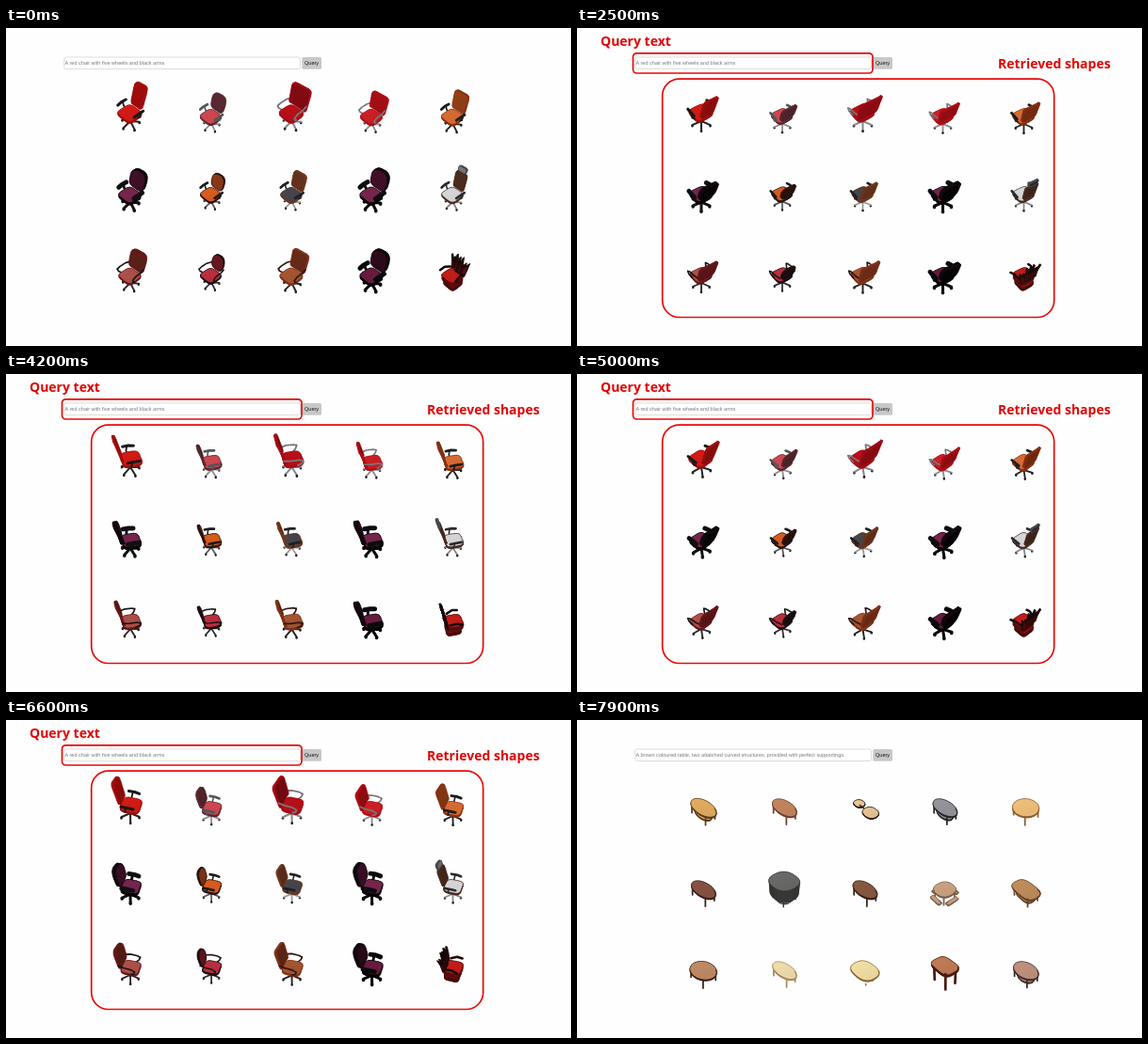
These frames come from a looping animation (600 by 338 pixels, 8000 ms). An HTML page with a canvas:

```html
<!DOCTYPE html>
<html lang="en">
<head>
<meta charset="utf-8">
<title>Shape retrieval</title>
<style>
  html, body { margin: 0; width: 100%; height: 100%; overflow: hidden; background: #fefefe; }
  canvas, svg { position: absolute; left: 0; top: 0; width: 600px; height: 338px; }
  .ui { font: 5.54px "Liberation Sans", Arial, sans-serif; text-rendering: geometricPrecision; }
  .note text { font: 700 14px "Open Sans", "Noto Sans", sans-serif; fill: #e00505; }
  .note rect { fill: none; stroke: #e60a0a; stroke-width: 1.7; }
</style>
</head>
<body>
<canvas id="stage" width="600" height="338"></canvas>
<svg viewBox="0 0 600 338">
  <g class="ui">
    <rect x="61.8" y="31" width="250.6" height="12.6" rx="2" fill="#fff" stroke="#cecece" stroke-width=".7"/>
    <text id="query" x="62.6" y="39.2" fill="#777"></text>
    <rect x="314.3" y="31" width="20.7" height="12.8" rx="1.5" fill="#c8c8c8"/>
    <text x="317" y="39.3" fill="#111">Query</text>
  </g>
  <g class="note" id="queryNote">
    <text x="25" y="19">Query text</text>
    <rect x="59.5" y="26.8" width="254.5" height="21.2" rx="4"/>
  </g>
  <g class="note" id="shapesNote">
    <text x="447" y="42.7">Retrieved shapes</text>
    <rect x="90.7" y="54.2" width="416" height="253.3" rx="18"/>
  </g>
</svg>
<script>
const $ = id => document.getElementById(id);
const ctx = $('stage').getContext('2d');
ctx.lineJoin = ctx.lineCap = 'round';

const LOOP = 8000, STEP = 100, SWITCH = 7800;
const TILT = 0.76, SIN = Math.sin(TILT), COS = Math.cos(TILT), DIST = 150;
const COLS = [132, 218, 303.5, 388.5, 474.5], ROWS = [87, 174, 260];
// time, degrees; 0 faces the viewer
const TURN = [[0, -46], [800, 53], [1000, 53], [1700, 141], [1900, 141], [2500, 216],
  [3400, 343], [5000, 584], [6000, 720], [6600, 793], [8000, 980]];

// size, half width, back height, squareness, arms, seat, back, rear, base, arm colour
const CHAIRS = [
  [.95, 8.5, 27, 6, 'pad', '#dc1c16', '#a40c0c', '#a41010', '#222', '#181818'],
  [.84, 10.5, 22, 3.5, 'pad', '#d84a54', '#5c2a32', '#5c2a32', '#8c8c90', '#55555a'],
  [.95, 13, 25, 9, 'loop', '#c01018', '#860a12', '#a80c16', '#85858a', '#77777c'],
  [.86, 12.5, 22, 9, 'loop', '#d42026', '#a80e14', '#b01016', '#8c8c90', '#77777c'],
  [.87, 10.5, 24, 7, 'pad', '#e07034', '#964018', '#8a3214', '#222', '#1c1c1c'],
  [.88, 11.5, 23, 3.2, 'thick', '#7c2650', '#42102a', '#080608', '#111', '#101012'],
  [.82, 10, 20, 3, 'pad', '#e2601e', '#8e3a18', '#2c1410', '#56565a', '#1a1a1a'],
  [.84, 10, 22, 6, 'pad', '#48484e', '#66341e', '#74381e', '#9a9a9e', '#202024'],
  [.9, 12, 23, 3.2, 'thick', '#7c2650', '#42102a', '#060406', '#0c0c0c', '#0c0c0e'],
  [.85, 8.5, 22, 7, 'head', '#e0e0e2', '#4e2e1e', '#4a2c20', '#88888c', '#2a2a2e'],
  [.87, 12, 24, 4.5, 'loop', '#b4544c', '#5e2018', '#6a181c', '#2a2526', '#141414'],
  [.82, 9.5, 20, 2.5, 'loop', '#c43040', '#6c1820', '#1e1012', '#2c2c2e', '#161616'],
  [.9, 11.5, 23, 8, 'loop', '#ac5832', '#6a2c18', '#82341a', '#261e1c', '#2e1814'],
  [.9, 12, 23, 3.2, 'thick', '#6e1c42', '#2e0a1a', '#060406', '#080808', '#09090a'],
  [.84, 11, 24, 4, 'spikes', '#cc1e1a', '#300c0c', '#5c0e0e', '#50100e', '#180808']
];

// top colour, edge colour, half length, half width, squareness, kind
const TABLES = [
  ['#e8b062', '#5a3a20', 18.5, 10.5, 2, 'shelf'],
  ['#c88862', '#704232', 17.5, 10, 2, 'legs'],
  ['#f0cc98', '#201812', 8, 6, 2.3, 'pair'],
  ['#98989e', '#26262a', 17.5, 10, 2, 'shelf'],
  ['#f4c47c', '#8a6034', 15.5, 14.5, 2, 'legs'],
  ['#8a5444', '#38201a', 17.5, 10, 2, 'legs'],
  ['#6a6a68', '#3a3a38', 16, 15, 2.4, 'drum'],
  ['#8c5a42', '#38201a', 17.5, 10, 2, 'legs'],
  ['#d0a684', '#7a5e4a', 12, 12, 2.4, 'bench'],
  ['#c4905e', '#64442a', 18, 11, 3, 'shelf'],
  ['#c48e66', '#3a2418', 16.5, 14, 2, 'legs'],
  ['#f6e2b0', '#a88a5c', 17.5, 9.5, 2, 'legs'],
  ['#f8e4a8', '#8a6836', 17, 13, 2.6, 'stem'],
  ['#c47c56', '#4a1c14', 15, 11, 3.5, 'tall'],
  ['#c49480', '#3c2c28', 17, 11.5, 2, 'shelf']
];

let parts, cos, sin, ox, oy, size;

function begin(x, y, scale, degrees) {
  const a = degrees * Math.PI / 180;
  [parts, cos, sin, ox, oy, size] = [[], Math.cos(a), Math.sin(a), x, y, scale];
}

function view([x, y, z]) {
  const ahead = y * cos - x * sin;
  return [x * cos + y * sin, z * COS - ahead * SIN, ahead * COS + z * SIN];
}

function path(pts) {
  ctx.beginPath();
  for (const [x, up, depth] of pts) {
    const k = size * DIST / (DIST - depth);
    ctx.lineTo(ox + x * k, oy - up * k);
  }
}

const depthOf = pts => pts.reduce((sum, p) => sum + p[2], 0) / pts.length;

// How squarely a face meets the eye, 0 to 1
function facing(pts) {
  const n = pts.length, [a, b, c] = [pts[0], pts[n / 3 | 0], pts[2 * n / 3 | 0]];
  const [u, v] = [b, c].map(p => p.map((q, i) => q - a[i]));
  const nx = u[1] * v[2] - u[2] * v[1], ny = u[2] * v[0] - u[0] * v[2], nz = u[0] * v[1] - u[1] * v[0];
  return Math.abs(nz) / (Math.hypot(nx, ny, nz) || 1);
}

function face(pts, color, rim) {
  path(pts);
  ctx.fillStyle = color;
  ctx.fill();
  const dark = .5 * Math.max(0, .65 - facing(pts));
  const shade = ctx.createLinearGradient(ox - 12, oy - 22, ox + 12, oy + 22);
  shade.addColorStop(0, `rgba(0,0,0,${dark})`);
  shade.addColorStop(1, `rgba(0,0,0,${dark + .1})`);
  ctx.fillStyle = shade;
  ctx.fill();
  ctx.strokeStyle = rim;
  ctx.lineWidth = .5;
  ctx.closePath();
  ctx.stroke();
}

function slab(front, rear, color, rearColor, side) {
  const [f, r] = [front.map(view), rear.map(view)];
  const faces = f.map((p, i) => {
    const j = (i + 1) % f.length;
    return [[p, f[j], r[j], r[i]], side];
  });
  faces.push([f, color], [r, rearColor]);
  faces.sort((a, b) => depthOf(a[0]) - depthOf(b[0]));
  parts.push([depthOf([...f, ...r]), () => faces.forEach(([pts, c]) => face(pts, c, side))]);
}

function tube(pts, color, width) {
  const p = pts.map(view);
  parts.push([depthOf(p), () => {
    path(p);
    ctx.strokeStyle = color;
    ctx.lineWidth = width * size;
    ctx.stroke();
  }]);
}

function paint() {
  parts.sort((a, b) => a[0] - b[0]).forEach(p => p[1]());
}

// Superellipse: 2 is an oval, larger is squarer
function outline(w, h, power, n = 28) {
  const bend = q => Math.sign(q) * Math.abs(q) ** (2 / power);
  return Array.from({ length: n }, (_, i) => {
    const a = (i + .5) / n * 2 * Math.PI;
    return [w * bend(Math.cos(a)), h * bend(Math.sin(a))];
  });
}

function plate(w, h, power, z, thick, color, side, x = 0, y = 0) {
  const at = level => outline(w, h, power).map(([u, v]) => [x + u, y + v, level]);
  slab(at(z), at(z - thick), color, side, side);
}

function backrest(w, h, power, z, thick, color, rear, side) {
  const at = shift => outline(w, h / 2, power).map(([u, v]) => {
    const up = v + h / 2;
    return [u, -9 - (z + 3 + up) * .24 + u * u * .012 - shift, z + up];
  });
  slab(at(0), at(thick), color, rear, side);
}

function arm(side, kind, color) {
  const x = side * 13;
  if (kind === 'loop') {
    tube([[x * .85, -11, 5], [x, -4, 5.5], [x, 5, 5], [x * 1.03, 9, 3]], color, 1.9);
    tube([[x * 1.03, 9, 3], [x, 8, -1], [x * .85, 4, -5]], color, 1.9);
    return;
  }
  const wide = kind === 'thick' ? 5.5 : 3.2;
  tube([[x * .8, -2, -6], [x * 1.05, -2, -3], [x * 1.05, -1, 3]], color, wide * .6);
  tube([[x * 1.05, -6, 3.5], [x * 1.05, 1, 3.8], [x, 7, 3]], color, wide);
}

function spikes(w, color, rear, edge) {
  for (let i = -3; i <= 3; i++) {
    const u = i * 3, tip = 17 - Math.abs(i) * 2 + (i & 1) * 4;
    const at = y => [[u - 2.4, y, -5], [u + 2.4, y, -5], [u * 1.25 + 2, y - 2, 6], [u * 1.6, y - 4, tip], [u * 1.1 - 2, y - 2, 6]];
    slab(at(-8), at(-10), i & 1 ? rear : color, rear, edge);
  }
  for (const s of [-1, 1]) tube([[s * w, -6, 0], [s * 13, 2, 3], [s * 14, 9, 1]], edge, 3);
  plate(10, 10, 5, -15, 6, '#b01a18', '#4c0c0c');
}

function chair([scale, w, h, power, kind, seat, back, rear, base, armColor], x, y, angle) {
  begin(x, y, scale, angle);
  const spiky = kind === 'spikes', thick = kind === 'thick';
  plate(11.5, 11, 4, -4, spiky ? 7 : thick ? 4 : 2.5, seat, rear, 0, 1);
  if (spiky) {
    spikes(w, back, rear, armColor);
    return paint();
  }
  backrest(w, h, power, -1, thick ? 4 : 2, back, rear, thick ? '#120a0e' : rear);
  if (kind === 'head') backrest(6, 6, 4, h, 2, '#77777a', '#2e2e32', '#4a4a4e');
  tube([[0, 0, -20], [0, 0, -7]], base, 2.8);
  for (let i = 0; i < 5; i++) {
    const a = (i * 72 + 18) * Math.PI / 180, [u, v] = [11.5 * Math.cos(a), 11.5 * Math.sin(a)];
    tube([[0, 0, -19], [u, v, -22]], base, thick ? 3.4 : 2.1);
    tube([[u, v, -23.4], [u, v, -24]], thick ? base : '#1c1c1c', thick ? 4 : 2.8);
  }
  for (const s of [-1, 1]) arm(s, kind, armColor);
  paint();
}

function legs(w, h, top, floor, color, width) {
  for (const u of [-w, w]) for (const v of [-h, h]) tube([[u, v, top], [u * 1.05, v * 1.05, floor]], color, width);
}

function table([color, edge, w, h, power, kind], x, y, angle) {
  begin(x, y, .92, angle);
  if (kind === 'pair') {
    for (const s of [-1, 1]) {
      plate(s < 0 ? 7 : 9, s < 0 ? 6 : 8, power, 4, 1, color, edge, s * 10, 0);
      tube([[s * 10, 0, 3], [s * 10, 0, -3]], edge, 1.5);
    }
    tube([[-9, 0, 2], [9, 0, 2]], edge, 1.5);
  } else if (kind === 'drum') {
    plate(w, h, power, 17, 17, color, edge);
    legs(w * .6, h * .6, 0, -10, edge, 1.6);
    tube(outline(w * .6, h * .6, 2).map(([u, v]) => [u, v, -10]), edge, 1.4);
  } else {
    const tall = kind === 'tall', top = tall ? 12 : 5;
    plate(w, h, power, top, tall ? 3 : 1.6, color, edge);
    if (kind === 'stem') {
      tube([[0, 0, 3], [0, 0, -8]], edge, 2.4);
      legs(8, 5, -8, -10, edge, 1.5);
    } else legs(w * .66, h * .66, top - 2, tall ? -14 : -9, edge, tall ? 3 : 1.9);
    if (kind === 'shelf') plate(w * .7, h * .7, power, -5, 1.4, color, edge);
    if (kind === 'bench') {
      for (let i = 0; i < 4; i++) {
        const a = i * Math.PI / 2;
        plate(i & 1 ? 8 : 2.5, i & 1 ? 2.5 : 8, 5, -4, 1.2, color, edge, 13 * Math.cos(a), 13 * Math.sin(a));
      }
    }
  }
  paint();
}

function turnAt(t) {
  const i = TURN.findIndex(k => k[0] > t), [t0, a0] = TURN[i - 1], [t1, a1] = TURN[i];
  return a0 + (a1 - a0) * (t - t0) / (t1 - t0);
}

function draw(now) {
  const t = Math.floor(now % LOOP / STEP) * STEP, isTable = t >= SWITCH;
  $('query').textContent = isTable
    ? 'A brown coloured table, two attatched curved structures, provided with perfect supportings.'
    : 'A red chair with five wheels and black arms';
  $('queryNote').style.display = t >= 400 && t < 7300 ? '' : 'none';
  $('shapesNote').style.display = t >= 1400 && t < 7300 ? '' : 'none';
  ctx.clearRect(0, 0, 600, 338);
  const angle = isTable ? -50 - (7900 - t) * .13 : turnAt(t);
  for (let i = 0; i < 15; i++) {
    const x = COLS[i % 5], y = ROWS[i / 5 | 0];
    if (isTable) table(TABLES[i], x + 2, y + 9, angle);
    else chair(CHAIRS[i], x, y + (i < 5 && i !== 0 && i !== 2 ? 4 : 0), angle);
  }
}

function tick(now) {
  draw(now);
  requestAnimationFrame(tick);
}
draw(0);
requestAnimationFrame(tick);
</script>
</body>
</html>
```
